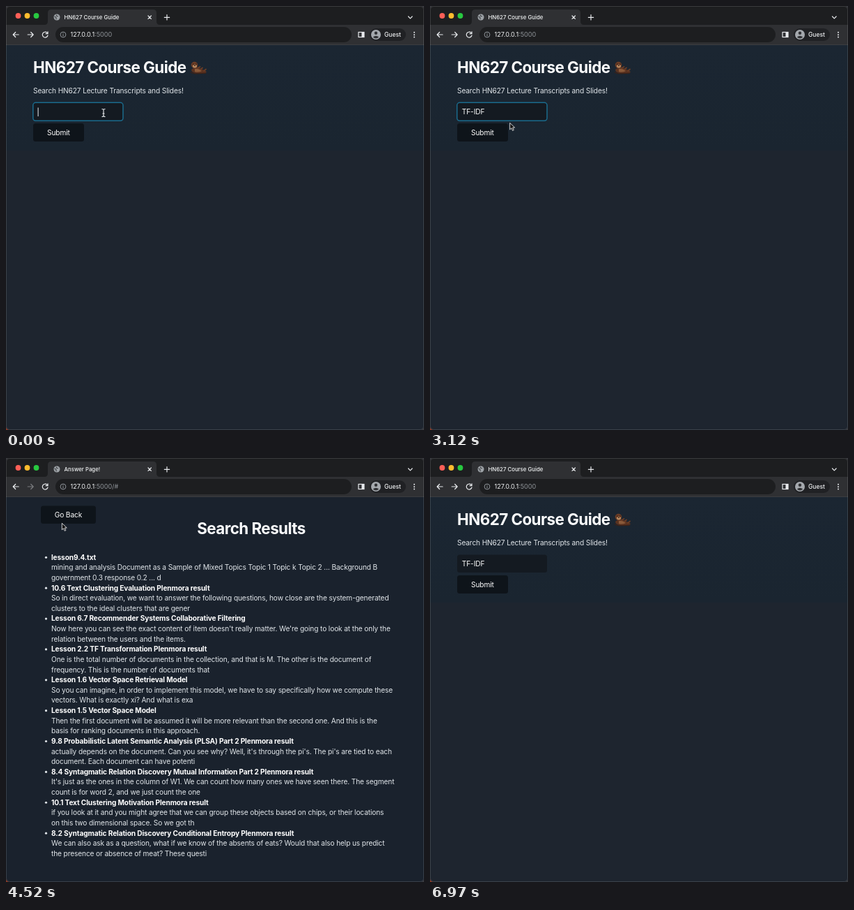
These frames come from a looping animation (600 px wide and 607 px high, 7000 ms). An HTML page:

```html
<!DOCTYPE html>
<html lang="en">
<head>
<meta charset="utf-8">
<title>HN627 Course Guide</title>
<style>
  html, body { margin: 0; width: 100%; height: 100%; overflow: hidden; background: #3c3d42; }
  svg { display: block; }
  text { font: 10.2px Inter, "Open Sans", sans-serif; letter-spacing: -.145px; fill: #e1e6ea; white-space: pre; }
  .h1 { font-size: 22.4px; font-weight: 700; letter-spacing: -.56px; fill: #fafbfc; }
  .b { font-weight: 700; fill: #fff; }
  .w { fill: #fff; }
  .tab { font-size: 7.8px; font-weight: 500; letter-spacing: 0; fill: #f1f3f4; }
  .url { font-size: 9.1px; letter-spacing: 0; fill: #f1f3f4; }
  .guest { font-size: 8.5px; font-weight: 500; letter-spacing: 0; fill: #f1f3f4; }
  .dim { fill: #8f9499; }
  .line { fill: none; stroke: #e8eaed; stroke-width: 1.2; stroke-linecap: round; stroke-linejoin: round; }
  .ring { fill: none; stroke: #1a6b8d; stroke-width: 1.5; }
  .point { fill: #fff; stroke: #111; stroke-width: .8; stroke-linejoin: round; }
</style>
</head>
<body>
<svg width="600" height="607" viewBox="0 0 600 607">
  <defs>
    <linearGradient id="sky" x1="0" y1="0" x2="0" y2="1">
      <stop offset="0" stop-color="#1b2632"/>
      <stop offset="1" stop-color="#1a2530"/>
    </linearGradient>
    <clipPath id="frame"><rect width="600" height="607" rx="5"/></clipPath>
  </defs>
  <rect y="602" width="5" height="5" fill="#8f3c28"/>

  <g clip-path="url(#frame)">
    <!-- browser bar -->
    <rect width="600" height="56" fill="#1d1e20"/>
    <rect y="27" width="600" height="28" fill="#2f3033"/>
    <rect y="55" width="600" height="1" fill="#3b3d40"/>
    <path d="M55 27Q60 27 60 22V10Q60 5 65 5H211Q216 5 216 10V22Q216 27 221 27Z" fill="#2f3033"/>
    <circle cx="17.5" cy="14" r="3.9" fill="#ff5f57"/>
    <circle cx="30.5" cy="14" r="3.9" fill="#febc2e"/>
    <circle cx="43.5" cy="14" r="3.9" fill="#28c840"/>
    <g id="globe">
      <circle cx="73" cy="16" r="4.5" fill="#9da2a7"/>
      <path d="M69.6 15l2.4 1.6v2.6M72.2 12.6l.4 1.7 2.2.3" fill="none" stroke="#3a3b3f" stroke-width="1.1"/>
    </g>
    <path id="spin" d="M73 12A4 4 0 0 0 70.6 12.8" fill="none" stroke="#7d8287" stroke-width=".9"/>
    <text id="tab" class="tab" x="83.5" y="19.2"></text>
    <path class="line" d="M204 14l4.4 4.4M208.4 14l-4.4 4.4M227.3 16.3h7.4M231 12.6v7.4M577.5 15l2.8 2.8 2.8-2.8"/>
    <path class="line" d="M18.2 41h-8M13.7 37.500L10.2 41l3.500 3.500"/>
    <path id="forward" class="line" d="M31.2 41h8M35.7 37.500l3.500 3.500-3.500 3.500"/>
    <path id="reload" class="line" d="M59 38.4A3.900 3.900 0 1 0 60 42M60 36.800v2.900h-2.900"/>
    <path id="stop" class="line" d="M53 38l6.4 6.4M59.4 38L53 44.4"/>
    <rect x="71" y="30" width="425" height="22" rx="11" fill="#1d1e20"/>
    <circle cx="82" cy="41" r="3.9" fill="none" stroke="#9aa0a6" stroke-width=".9"/>
    <path d="M82 40.500v2.700M82 38.600v1" stroke="#9aa0a6"/>
    <text class="url" x="92.5" y="44.4">127.0.0.1<tspan id="path" class="dim"></tspan></text>
    <rect x="506" y="37.5" width="8" height="7" fill="none" stroke="#e8eaed" stroke-width="1.2"/>
    <rect x="510.5" y="37.5" width="3.5" height="7" fill="#e8eaed"/>
    <rect x="522" y="32" width="52" height="18" rx="9" fill="#202124"/>
    <circle cx="531" cy="41" r="7" fill="#a4a8ad"/>
    <circle cx="531" cy="38.8" r="2.2" fill="#303134"/>
    <path d="M526.8 44.6Q531 40.7 535.2 44.6Q531 48.6 526.8 44.6Z" fill="#303134"/>
    <text class="guest" x="543" y="44.2">Guest</text>
    <g fill="#e8eaed">
      <circle cx="586" cy="37.8" r="1"/><circle cx="586" cy="41.2" r="1"/><circle cx="586" cy="44.6" r="1"/>
    </g>

    <!-- search page -->
    <g id="home">
      <rect y="56" width="600" height="551" fill="#1e252f"/>
      <rect y="56" width="600" height="151" fill="url(#sky)"/>
      <text class="h1" x="39" y="96">HN627 Course Guide</text>
      <g>
        <path d="M270 88Q274 86 278 89L287 93Q289 96 284 96.500L272 96Q266 95 266 91Z" fill="#5a3220"/>
        <path d="M271 90Q276 89 281 93Q276 95.500 271 94Z" fill="#8a5a3a"/>
        <path d="M265 94.500q3 2.500 8 2.300t14-.6" fill="none" stroke="#3c2218" stroke-width="1.3"/>
        <circle cx="270.5" cy="84.5" r="4.7" fill="#6b3d26"/>
        <ellipse cx="271" cy="86.3" rx="2.9" ry="2.2" fill="#b98a62"/>
        <ellipse cx="271" cy="85.2" rx="1.1" ry=".8" fill="#1d120d"/>
        <circle cx="268.7" cy="83.3" r=".7" fill="#1d120d"/><circle cx="273" cy="83.3" r=".7" fill="#1d120d"/>
        <path d="M275 89l3.500-2M279 91l3-2.500M284 93l3-2.500" stroke="#6b3d26" stroke-width="1.8" stroke-linecap="round"/>
      </g>
      <text x="39" y="124.8">Search HN627 Lecture Transcripts and Slides!</text>
      <rect x="39" y="138.5" width="129" height="25.5" rx="3.5" fill="#141a21"/>
      <rect id="inputRing" class="ring" x="38.8" y="138.3" width="129.2" height="26" rx="3.8"/>
      <text id="typed" class="w" x="45.8" y="155.3"></text>
      <rect id="caret" y="145.5" width="1" height="12.5" fill="#e8edf2"/>
      <rect id="submit" x="39" y="168" width="73" height="26" rx="3.5"/>
      <rect id="submitRing" class="ring" x="38.8" y="167.8" width="73.4" height="26.4" rx="3.8"/>
      <text class="w" x="75.4" y="184.7" text-anchor="middle">Submit</text>
    </g>

    <!-- results page -->
    <g id="answers">
      <rect y="56" width="600" height="551" fill="#1a222d"/>
      <rect id="back" x="50" y="68.5" width="79" height="25.5" rx="3.5"/>
      <rect id="backRing" class="ring" x="49.3" y="67.8" width="80.4" height="27" rx="3.8"/>
      <text class="w" x="89.4" y="84.8" text-anchor="middle">Go Back</text>
      <text class="h1" x="352" y="109" text-anchor="middle">Search Results</text>
      <g id="list"></g>
    </g>
    <rect x=".5" y=".5" width="599" height="606" rx="5" fill="none" stroke="#fff" stroke-opacity=".13"/>
  </g>

  <g id="cursor">
    <path id="beam" d="M-2.500-5.500Q0-5.500 0-4V4Q0 5.500-2.500 5.500M2.500-5.500Q0-5.500 0-4M0 4Q0 5.500 2.500 5.500M-1.500 1h3" fill="none" stroke="#eef1f4" stroke-width="1.1"/>
    <path id="arrow" class="point" style="fill:#111;stroke:#fff" d="M0 0V9.500L2.300 7.400 3.900 11 5.600 10.200 4 6.700H7Z"/>
    <path id="hand" class="point" d="M-1 .6Q0-.8 1 .6V4L2.500 3.800 4 4.300 5.300 4.900Q5.900 7.500 4.600 9.200V10.500H-.7Q-1.200 9-3.300 6.400Q-3.500 5-2.200 5.300L-1 6.500Z"/>
  </g>
</svg>
<script>
const LOOP = 7000, BLINK = 550;
const el = Object.fromEntries([...document.querySelectorAll("[id]")].map(n => [n.id, n]));

const results = [
  ["lesson9.4.txt",
    "mining and analysis Document as a Sample of Mixed Topics Topic 1 Topic k Topic 2 ... Background B",
    "government 0.3 response 0.2 ... d"],
  ["10.6 Text Clustering Evaluation Plenmora result",
    "So in direct evaluation, we want to answer the following questions, how close are the system-generated",
    "clusters to the ideal clusters that are gener"],
  ["Lesson 6.7 Recommender Systems Collaborative Filtering",
    "Now here you can see the exact content of item doesn't really matter. We're going to look at the only the",
    "relation between the users and the items."],
  ["Lesson 2.2 TF Transformation Plenmora result",
    "One is the total number of documents in the collection, and that is M. The other is the document of",
    "frequency. This is the number of documents that"],
  ["Lesson 1.6 Vector Space Retrieval Model",
    "So you can imagine, in order to implement this model, we have to say specifically how we compute these",
    "vectors. What is exactly xi? And what is exa"],
  ["Lesson 1.5 Vector Space Model",
    "Then the first document will be assumed it will be more relevant than the second one. And this is the",
    "basis for ranking documents in this approach."],
  ["9.8 Probabilistic Latent Semantic Analysis (PLSA) Part 2 Plenmora result",
    "actually depends on the document. Can you see why? Well, it's through the pi's. The pi's are tied to each",
    "document. Each document can have potenti"],
  ["8.4 Syntagmatic Relation Discovery Mutual Information Part 2 Plenmora result",
    "It's just as the ones in the column of W1. We can count how many ones we have seen there. The segment",
    "count is for word 2, and we just count the one"],
  ["10.1 Text Clustering Motivation Plenmora result",
    "if you look at it and you might agree that we can group these objects based on chips, or their locations",
    "on this two dimensional space. So we got th"],
  ["8.2 Syntagmatic Relation Discovery Conditional Entropy Plenmora result",
    "We can also ask as a question, what if we know of the absents of eats? Would that also help us predict",
    "the presence or absence of meat? These questi"]
];
el.list.innerHTML = results.map((rows, i) => {
  const y = 145.7 + i * 43.87;
  return `<circle cx="57.5" cy="${y - 3.4}" r="1.6" fill="#e1e6ea"/>` + rows.map((row, j) =>
    `<text x="65" y="${y + j * 14.6}" class="${j ? "" : "b"}">${row}</text>`).join("");
}).join("");

// each row: start time, then values
const keys = [[-280, ""], [490, "T"], [700, "TF"], [940, "TF-"], [2120, "TF-I"], [2240, "TF-ID"], [2390, "TF-IDF"]];
const pages = [[0, "home"], [3910, "answers"], [5190, "home"]];
const shapes = [[0, "beam"], [490, ""], [2790, "beam"], [3080, "arrow"], [3170, "hand"],
  [4390, "arrow"], [4960, "hand"], [6610, ""]];
const moves = [[0, 140, 153], [2790, 140, 153], [3400, 95, 178.5], [4390, 95, 178.5],
  [4520, 80.3, 93.3], [4800, 80, 92.5], [5060, 78, 75], [LOOP, 78, 75]];

const last = (rows, t) => rows.filter(r => r[0] <= t).pop();
const show = (node, on) => node.setAttribute("visibility", on ? "inherit" : "hidden");
const within = (t, a, b) => t >= a && t < b;

function place(t) {
  const i = Math.max(1, moves.findIndex(m => m[0] > t));
  const [a, x, y] = moves[i - 1], [b, u, v] = moves[i];
  const p = (t - a) / (b - a), e = p * p * (3 - 2 * p);
  return [x + (u - x) * e, y + (v - y) * e];
}

function draw(t) {
  const [when, word] = last(keys, t);
  const page = last(pages, t)[1], home = page === "home";
  const shape = last(shapes, t)[1];
  const sent = within(t, 3520, 3910), left = within(t, 5100, 5190);
  const busy = sent || within(t, 3910, 3970) || left;

  show(el.home, home);
  show(el.answers, !home);
  el.tab.textContent = home ? "HN627 Course Guide" : "Answer Page!";
  el.path.textContent = home ? ":5000" : ":5000/#";

  show(el.globe, !busy);
  show(el.spin, busy);
  el.spin.setAttribute("transform", `rotate(${-t * .36 % 360} 73 16)`);
  el.forward.setAttribute("opacity", home || left ? 1 : .4);
  show(el.reload, !busy);
  show(el.stop, busy);

  el.typed.textContent = word;
  show(el.inputRing, t < 3520);
  show(el.caret, t < 3520 && Math.floor((t - when) / BLINK) % 2 === 0);
  el.caret.setAttribute("x", 45.6 + (word && home ? el.typed.getComputedTextLength() : 0));

  show(el.submitRing, sent);
  el.submit.setAttribute("fill", sent ? "#03070b" : "#0e141a");
  show(el.backRing, left);
  el.back.setAttribute("fill", left ? "#03070b" : "#0e141a");

  for (const name of ["beam", "arrow", "hand"]) show(el[name], shape === name);
  el.cursor.setAttribute("transform", `translate(${place(t)})`);
}

const start = performance.now();
function tick() {
  draw((performance.now() - start) % LOOP);
  requestAnimationFrame(tick);
}
tick();
</script>
</body>
</html>
```
